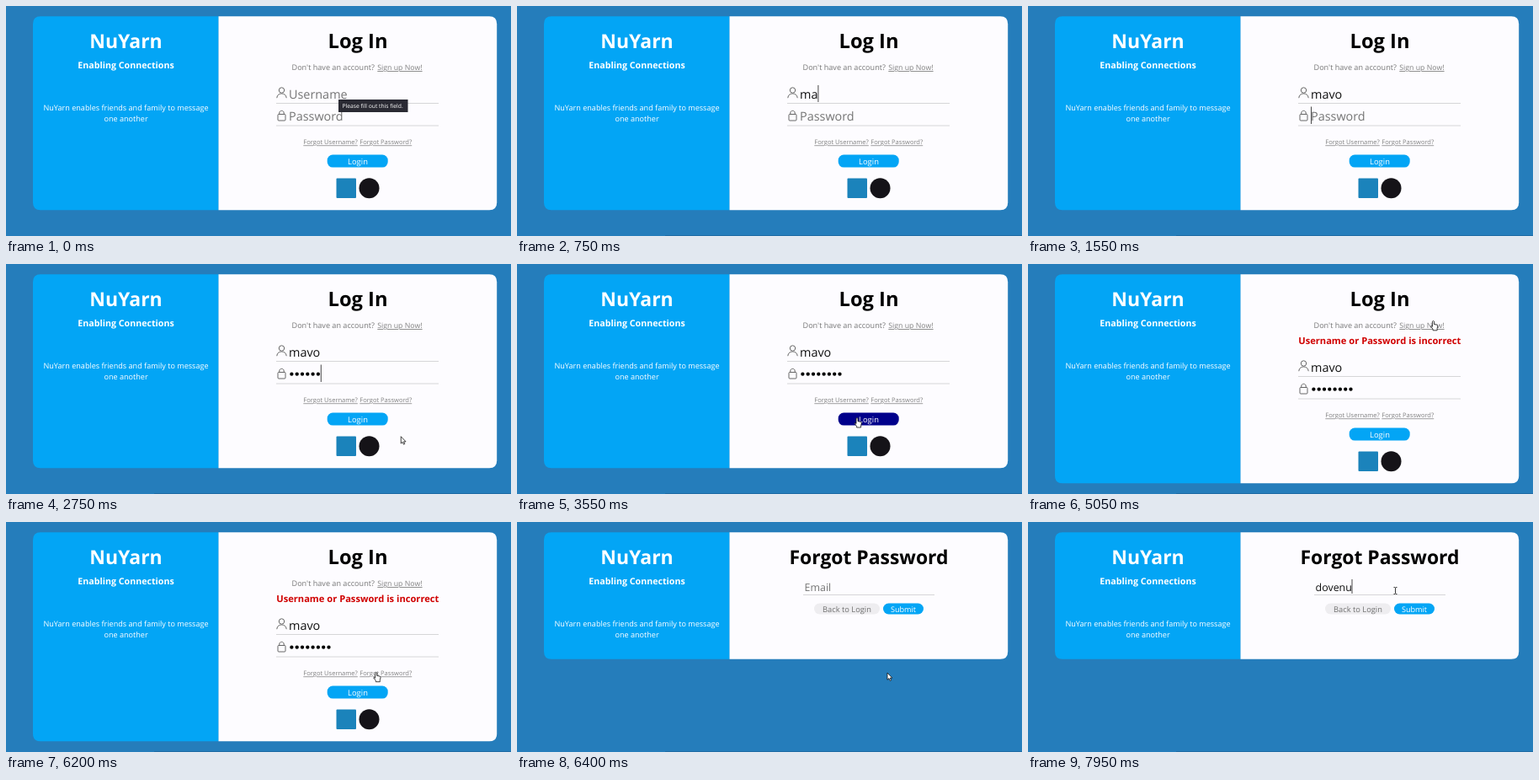
An HTML page for the animation above (8000 ms loop, 600x273 px).

```html
<!DOCTYPE html>
<html lang="en">
<head>
<meta charset="utf-8">
<title>Log in</title>
<style>
html, body { margin: 0; width: 100%; height: 100%; overflow: hidden; background: #257dbb; }
svg { display: block; width: 600px; height: 273px; font-family: "Open Sans", "Noto Sans", sans-serif; text-rendering: geometricPrecision; }
text { white-space: pre; }
.b { font-weight: 700; }
.m { text-anchor: middle; }
.link { fill: #808080; text-decoration: underline; text-decoration-thickness: .6px; }
.line { stroke: #d6d6d8; stroke-width: 1; }
.icon { fill: none; stroke: #666; stroke-width: 1; }
.caret { stroke: #333; stroke-width: .9; }
.cursor { fill: #fff; stroke: #111; stroke-width: .8; stroke-linejoin: round; }
</style>
</head>
<body>
<svg id="stage" viewBox="0 0 600 273"></svg>
<script>
const LOOP = 8000, STEP = 50;
const SUBMIT = 4000, RESET = 6400;
const USER = "mavo", MAIL = "dovenu", BRAND = "NuYarn";
const userKeys = [400, 650, 900, 1200];
const passKeys = [1750, 1850, 1950, 2050, 2500, 2700, 2800, 2900];
const mailKeys = [7250, 7350, 7500, 7650, 7850, 7950];
const TAB = 1500, FOCUS = 50, MAIL_FOCUS = 7100;
const LEFT = 32, SPLIT = 252.5, RIGHT = 583.2, TOP = 12.3, RADIUS = 9;

// time, x, y of the pointer's hot spot
const route = [
  [2700, 470, 205], [3500, 404, 182.5], [4400, 404, 182.5], [4600, 470, 84],
  [5000, 470, 84], [5050, 481.5, 67.3], [5300, 481.5, 67.3], [6200, 439.7, 178.2],
  [6350, 439.7, 178.2], [6400, 440, 179], [7100, 436.5, 81.5], [8000, 436.5, 81.5]
];

const text = (x, y, size, fill, str, cls = "", id = "") =>
  `<text x="${x}" y="${y}" font-size="${size}" fill="${fill}" class="${cls}" id="${id}">${str}</text>`;
const box = (x, y, w, h, r, fill, id = "") =>
  `<rect x="${x}" y="${y}" width="${w}" height="${h}" rx="${r}" fill="${fill}" id="${id}"/>`;
const rule = (x1, x2, y) => `<path class="line" d="M${x1} ${y}H${x2}"/>`;
const dots = passKeys.map((k, i) =>
  `<circle class="dot" cx="${339.4 + 6.3 * i}" cy="130.7" r="2.15"/>`).join("");

document.getElementById("stage").innerHTML =
  box(0, 0, 600, 273, 0, "#257dbb") +
  box(176, 272, 424, 1, 0, "#1f6ca5", "edge") +
  `<path id="panel" fill="#03a5f5"/><path id="card" fill="#fdfcff"/>` +
  text(142.5, 50, 23, "#fff", BRAND, "b m") +
  text(142.5, 74, 10.67, "#fff", "Enabling Connections", "b m") +
  text(142.5, 124, 9.08, "#fff", BRAND + " enables friends and family to message", "m") +
  text(142.5, 137, 9.08, "#fff", "one another", "m") +
  `<g id="login">` +
    text(418, 50, 23.7, "#000", "Log In", "b m") +
    text(339.5, 76, 9.1, "#777", "Don't have an account?") +
    text(441.3, 76, 8.75, "", "Sign up Now!", "link") +
    text(417.8, 94.8, 11.15, "#d00000", "Username or Password is incorrect", "b m", "error") +
    `<g id="form">` +
      `<g class="icon"><circle cx="327.5" cy="100" r="3.2"/>
       <path d="M321.8 109.2C322 102.2 333 102.2 333.2 109.2"/>
       <rect x="323" y="128.5" width="9" height="7.5" rx="1"/>
       <path d="M324.8 128.5V127C324.8 123.4 330.2 123.4 330.2 127V128.5"/></g>` +
      text(336, 110, 14.4, "#757575", "Username", "", "user") +
      text(336, 136, 14.4, "#757575", "Password", "", "pass") +
      dots +
      rule(321, 514, 115.5) + rule(321, 514, 142) +
      `<path id="loginCaret" class="caret"/>` +
      text(353.3, 164.4, 7.55, "", "Forgot Username?", "link") +
      text(420.3, 164.4, 7.55, "", "Forgot Password?", "link") +
      box(381.7, 176.6, 72, 15, 6.5, "#03a5f5", "button") +
      text(418, 188, 9.4, "#fff", "Login", "m") +
      box(392.5, 204.5, 23.5, 23.5, 1, "#1b83bb") +
      `<circle cx="431.5" cy="216.3" r="12" fill="#151318"/>` +
    `</g>` +
    `<g id="tip">` + box(395, 111, 82.5, 15, 0, "#2a2a33") +
      text(399.5, 121, 6.75, "#fff", "Please fill out this field.") + `</g>` +
  `</g>` +
  `<g id="forgot">` +
    text(418, 50, 22.9, "#000", "Forgot Password", "b m") +
    text(341.6, 82, 12.4, "#757575", "Email", "", "mail") +
    rule(340, 496, 86.5) +
    `<path id="mailCaret" class="caret"/>` +
    box(353, 96.5, 78, 13, 6.5, "#eeedf0") +
    text(392, 107, 9.3, "#707070", "Back to Login", "m") +
    box(435, 96.5, 48, 13, 6.5, "#03a5f5") +
    text(459, 107, 9.1, "#fff", "Submit", "m") +
  `</g>` +
  `<g id="pointer">
    <path id="arrow" class="cursor" d="M0 0V8.3L1.9 6.6L3.2 9.4L4.5 8.8L3.3 6.1H5.8Z"/>
    <path id="hand" class="cursor" d="M-1 .8Q0-.6 1 .8V4.2L4.4 4.9Q5.4 5.2 5.3 6.5L4.6 9.4V11.5H-.4V10L-3 6.7Q-2.6 5.5-1 7Z"/>
    <path id="beam" fill="none" stroke="#222" stroke-width=".9" d="M-2-4H-.6L0-3.4L.6-4H2M0-3.4V3.4M-2 4H-.6L0 3.4L.6 4H2"/>
  </g>`;

const el = {};
document.querySelectorAll("[id]").forEach(n => { if (n.id) el[n.id] = n; });
const dotEls = [...document.querySelectorAll(".dot")];

const show = (node, on) => node.setAttribute("display", on ? "inline" : "none");
const typed = (keys, t) => keys.filter(k => k <= t).length;
const inside = (p, x, y, w, h) => p.x >= x && p.x <= x + w && p.y >= y && p.y <= y + h;

// half of the card: straight at the split, rounded at the outer side
function halfCard(outer, bottom) {
  const inner = outer + Math.sign(SPLIT - outer) * RADIUS;
  return `M${SPLIT} ${TOP}H${inner}Q${outer} ${TOP} ${outer} ${TOP + RADIUS}` +
    `V${bottom - RADIUS}Q${outer} ${bottom} ${inner} ${bottom}H${SPLIT}Z`;
}

function fillField(node, value, hint) {
  node.textContent = value || hint;
  node.setAttribute("fill", value ? "#111" : "#757575");
}

function drawCaret(node, t, events, x, y1, y2) {
  const last = events.filter(e => e <= t).pop();
  show(node, last !== undefined && (t - last) % 1000 < 500);
  node.setAttribute("d", `M${x} ${y1}V${y2}`);
}

function pointerAt(t) {
  let i = 0;
  while (i < route.length - 2 && route[i + 1][0] <= t) i++;
  const [t0, x0, y0] = route[i], [t1, x1, y1] = route[i + 1];
  const u = Math.min(1, Math.max(0, (t - t0) / (t1 - t0)));
  const e = u * u * (3 - 2 * u);
  return { x: x0 + (x1 - x0) * e, y: y0 + (y1 - y0) * e };
}

function update(t) {
  const forgot = t >= RESET, failed = t >= SUBMIT && !forgot;
  const shift = failed ? 18 : 0;
  const bottom = forgot ? 162.8 : 242.3 + shift;

  el.panel.setAttribute("d", halfCard(LEFT, bottom));
  el.card.setAttribute("d", halfCard(RIGHT, bottom));
  show(el.edge, t >= FOCUS);
  show(el.login, !forgot);
  show(el.forgot, forgot);
  show(el.error, failed);
  show(el.tip, t < FOCUS);
  el.form.setAttribute("transform", `translate(0 ${shift})`);

  const users = typed(userKeys, t), passes = typed(passKeys, t), mails = typed(mailKeys, t);
  fillField(el.user, USER.slice(0, users), "Username");
  fillField(el.mail, MAIL.slice(0, mails), "Email");
  show(el.pass, !passes);
  dotEls.forEach((d, i) => show(d, i < passes));

  if (t < TAB) {
    const x = 336.5 + (users ? el.user.getComputedTextLength() : 0);
    drawCaret(el.loginCaret, t, [FOCUS, ...userKeys], x, 94, 114);
  } else {
    drawCaret(el.loginCaret, t, [TAB, ...passKeys], 336.5 + 6.3 * passes, 119.5, 140);
    if (failed) show(el.loginCaret, false);
  }
  if (forgot) {
    const x = 341.8 + (mails ? el.mail.getComputedTextLength() : 0);
    drawCaret(el.mailCaret, t, [MAIL_FOCUS, ...mailKeys], x, 68, 85);
  }

  const p = pointerAt(t);
  const hover = !forgot && t >= route[0][0] && inside(p, 382, 177 + shift, 72, 15);
  const onLink = !forgot && (inside(p, 441, 67, 54, 12) ||
    inside(p, 353, 156 + shift, 65, 12) || inside(p, 420, 156 + shift, 63, 12));
  const onField = forgot ? inside(p, 340, 67, 156, 20) :
    inside(p, 336, 93 + shift, 178, 22) || inside(p, 336, 120 + shift, 178, 22);
  const hand = hover || onLink;
  el.button.setAttribute("fill", hover ? "#00008b" : "#03a5f5");
  show(el.pointer, t >= route[0][0]);
  el.pointer.setAttribute("transform", `translate(${p.x} ${p.y})`);
  show(el.hand, hand);
  show(el.beam, onField && !hand);
  show(el.arrow, !hand && !onField);
}

const start = performance.now();
function tick() {
  const t = (performance.now() - start) % LOOP;
  update(Math.floor(t / STEP) * STEP);
  requestAnimationFrame(tick);
}
tick();
</script>
</body>
</html>
```
